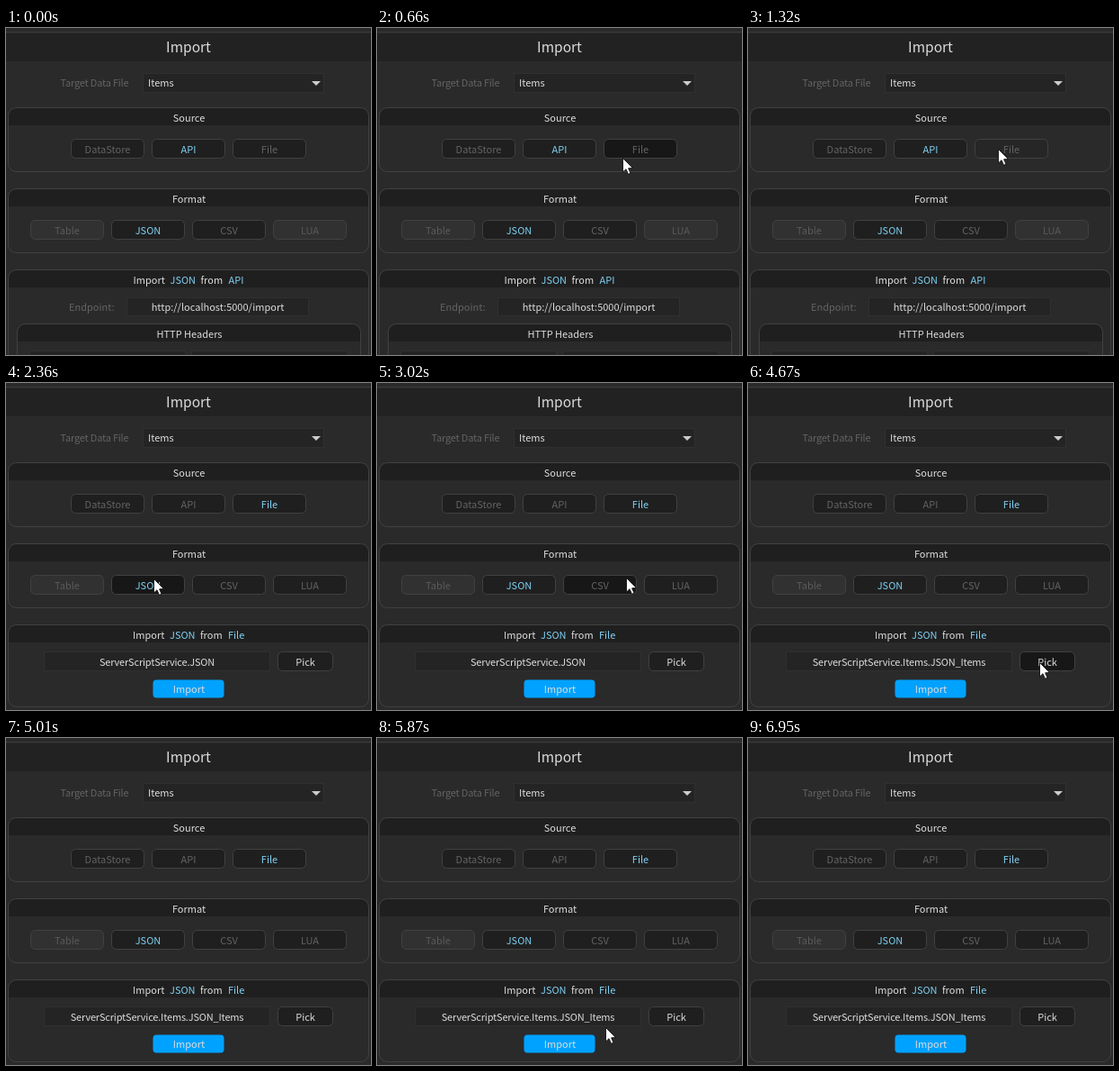
Animation of 406x363 px, one loop 7.82 s. Source, as an HTML page with a canvas:

```html
<!DOCTYPE html>
<html lang="en">
<head>
<meta charset="utf-8">
<title>Import</title>
<style>
  html, body { margin: 0; width: 100%; height: 100%; overflow: hidden; background: #2a2a2a; }
  canvas { display: block; }
</style>
</head>
<body>
<canvas id="stage" width="406" height="363"></canvas>
<script>
const ctx = document.getElementById('stage').getContext('2d');
const LOOP = 7820;
const FONT = '"Noto Sans CJK SC", "Noto Sans CJK JP", "Noto Sans CJK", "Noto Sans", sans-serif';
const BG = '#2a2a2a', DARK = '#1f1f1f', HOVER = '#171717', FIELD = '#242424';
const LINE = '#414141', WHITE = '#dcdcdc', GREY = '#636363', CYAN = '#7fd2f5', BLUE = '#00a2ff';

// Cursor visits: time, x, y. A null entry hides it until the next one.
const PATH = [
  [240, 194, 358], [740, 279, 129], [880, 278, 134], [1900, 278, 134],
  [2360, 164, 217], [2560, 164, 217], [3270, 321, 216], [3390, 321, 216],
  [3770, 326, 310], [4630, 326, 310], [4670, 324, 310], [5010, 407, 264], null,
  [5710, 396, 264], [5870, 254, 321], [6210, 222, 339],
  [6909, 222, 339], [6910, 222, 353], [6950, 222, 353], null
];

function cursorAt(t) {
  for (let i = 0; i < PATH.length - 1; i++) {
    const a = PATH[i], b = PATH[i + 1];
    if (!a || !b || t < a[0] || t >= b[0]) continue;
    const u = (t - a[0]) / (b[0] - a[0]), e = u * u * (3 - 2 * u);
    return { x: Math.round(a[1] + (b[1] - a[1]) * e), y: Math.round(a[2] + (b[2] - a[2]) * e) };
  }
  return null;
}

function rect(x, y, w, h, color) {
  ctx.fillStyle = color;
  ctx.fillRect(x, y, w, h);
}

function rounded(x, y, w, h, r, fill, stroke) {
  ctx.beginPath();
  ctx.roundRect(x + .5, y + .5, w - 1, h - 1, r);
  if (fill) { ctx.fillStyle = fill; ctx.fill(); }
  if (stroke) { ctx.strokeStyle = stroke; ctx.lineWidth = 1; ctx.stroke(); }
}

function text(str, x, y, color = WHITE, { align = 'center', size = 11, spacing = 0 } = {}) {
  ctx.font = `${size}px ${FONT}`;
  ctx.letterSpacing = spacing + 'px';
  ctx.textAlign = align;
  ctx.fillStyle = color;
  ctx.fillText(str, x, y);
}

function card(x, y, w, h, title) {
  rounded(x, y, w, h, 9, BG);
  ctx.save();
  ctx.clip();
  rect(x, y, w, 20, DARK);
  ctx.restore();
  rounded(x, y, w, h, 9, null, LINE);
  if (title) text(title, x + w / 2 + .5, y + 16);
}

function field(x, y, w, h) {
  rect(x, y, w, h, '#303030');
  rect(x + 1, y + 1, w - 2, h - 2, FIELD);
}

function button(label, x, y, w, mouse, { color = GREY, disabled = false, pressed = false } = {}) {
  const over = mouse && mouse.x >= x && mouse.x < x + w && mouse.y >= y && mouse.y < y + 22;
  const fill = disabled ? '#313131' : pressed ? '#262626' : over ? HOVER : DARK;
  rounded(x, y, w, 22, 5, fill, LINE);
  text(label, x + w / 2, y + 16, disabled ? '#5a5a5a' : color);
}

function drawCursor({ x, y }) {
  ctx.beginPath();
  [[.5, .5], [.5, 16], [4, 12.7], [6.5, 18.3], [9, 17.2], [6.6, 11.8], [11.5, 11.5]]
    .forEach(([dx, dy]) => ctx.lineTo(x + dx, y + dy));
  ctx.closePath();
  ctx.fillStyle = '#fff';
  ctx.fill();
  ctx.strokeStyle = '#111';
  ctx.lineWidth = .9;
  ctx.stroke();
}

function drawHeading(source, shift) {
  const left = { align: 'left' };
  text('Import', 141 + shift, 284, WHITE, left);
  text('JSON', 182 + shift, 284, CYAN, left);
  text('from', 216 + shift, 284, WHITE, left);
  text(source, 247 + shift, 284, CYAN, left);
}

function drawApiPanel() {
  card(2, 268, 402, 120);
  drawHeading('API', .5);
  text('Endpoint:', 70, 314, GREY, { align: 'left' });
  field(134, 299, 203, 21);
  text('http://localhost:5000/import', 235.5, 314);
  card(12, 328, 383, 70, 'HTTP Headers');
  field(26, 358, 174, 21);
  field(206, 358, 174, 21);
}

function drawFilePanel(t, mouse) {
  card(2, 268, 402, 92);
  drawHeading('File', 0);
  field(42, 298, 252, 22);
  const path = t < 4140 ? 'ServerScriptService.JSON' : 'ServerScriptService.Items.JSON_Items';
  text(path, 168, 314, WHITE, { spacing: -.18 });
  button('Pick', 302, 298, 62, mouse, { color: WHITE, pressed: t >= 4100 && t < 4180 });
  rounded(163, 329, 80, 21, 4, t >= 6500 && t < 6580 ? '#0084d0' : BLUE);
  text('Import', 203.5, 344);
}

function draw(t) {
  const mouse = cursorAt(t), fromFile = t >= 1440;
  rect(0, 0, 406, 363, BG);
  rect(0, 4, 406, 1, '#3a3a3a');
  rect(0, 6, 406, 31, '#222');
  text('Import', 203, 27, WHITE, { size: 15.5 });

  text('Target Data File', 60.5, 65, GREY, { align: 'left', spacing: -.2 });
  field(152, 50, 202, 22);
  text('Items', 158, 65, WHITE, { align: 'left' });
  ctx.beginPath();
  ctx.moveTo(340, 59);
  ctx.lineTo(350, 59);
  ctx.lineTo(345, 64);
  ctx.fillStyle = '#ccc';
  ctx.fill();

  card(2, 88, 402, 72, 'Source');
  button('DataStore', 72, 123, 82, mouse);
  button('API', 162, 123, 82, mouse, { color: fromFile ? GREY : CYAN });
  button('File', 252, 123, 82, mouse, { color: fromFile ? CYAN : GREY, pressed: t >= 1200 && !fromFile });

  card(2, 178, 402, 72, 'Format');
  button('Table', 27, 213, 82, mouse, { disabled: true });
  button('JSON', 117, 213, 82, mouse, { color: CYAN });
  button('CSV', 207, 213, 82, mouse);
  button('LUA', 297, 213, 82, mouse, { disabled: !fromFile });

  if (fromFile) drawFilePanel(t, mouse);
  else drawApiPanel();
  if (mouse) drawCursor(mouse);
}

const start = performance.now();
function tick() {
  draw((performance.now() - start) % LOOP);
  requestAnimationFrame(tick);
}
tick();
</script>
</body>
</html>
```
